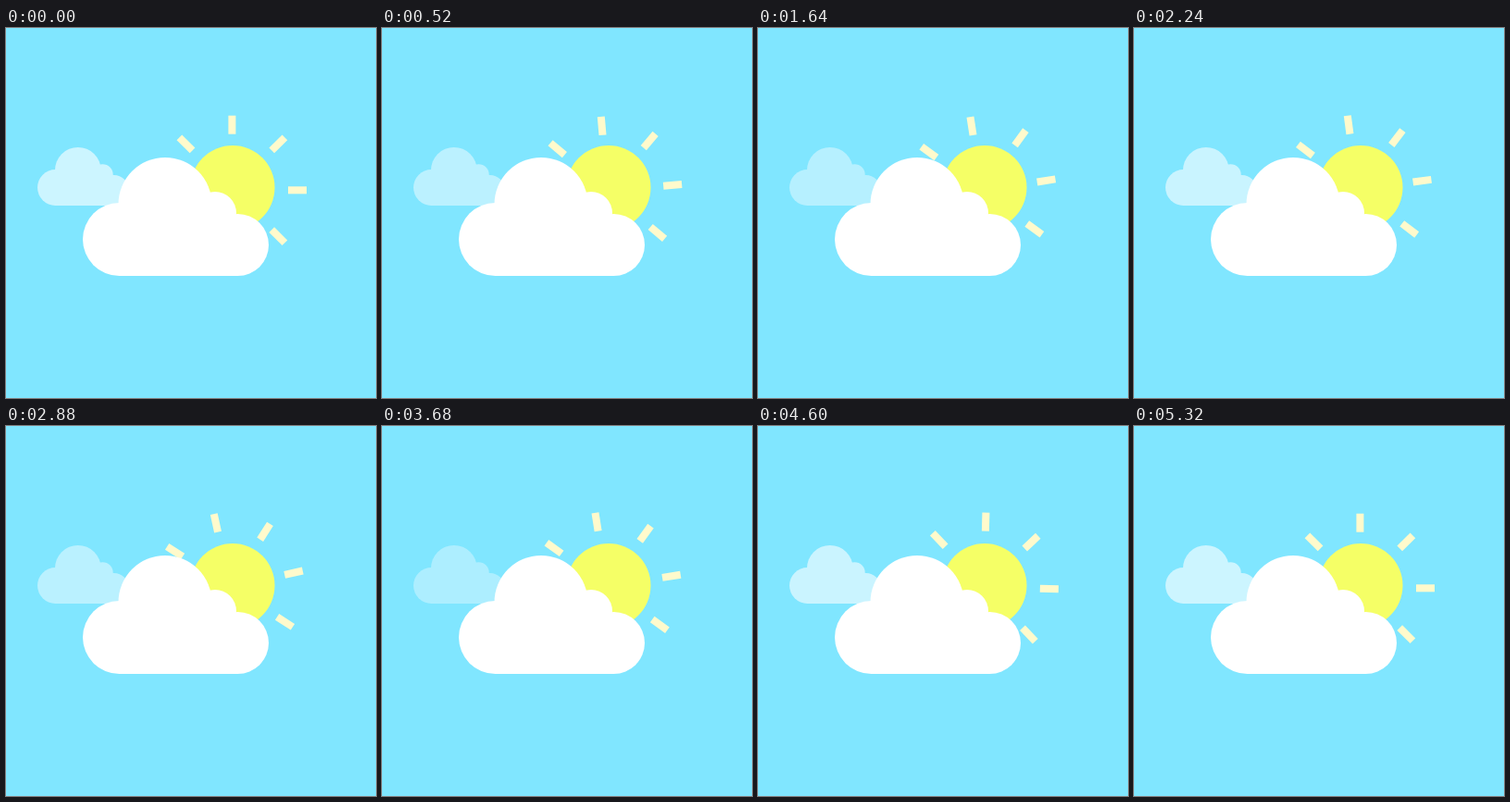
Animation of 400x400 px, one loop 5360 ms. Source, as an HTML page:

```html
<!DOCTYPE html>
<html lang="en">
<head>
<meta charset="utf-8">
<title>Sun and clouds</title>
<style>
  html, body { margin: 0; width: 100%; height: 100%; overflow: hidden; background: #80e6ff; }
  svg { display: block; width: 100%; height: 100%; }
</style>
</head>
<body>
<svg viewBox="0 0 400 400">
  <defs>
    <g id="cloud" fill="#fff">
      <circle cx="122.5" cy="228.5" r="39.5"/>
      <circle cx="172" cy="190.5" r="50.5"/>
      <circle cx="226" cy="200" r="23"/>
      <circle cx="250.5" cy="234.5" r="33.5"/>
      <path d="M122 268V228L172 190L226 200L250.5 234V268Z"/>
    </g>
    <rect id="ray" x="60.6" y="-4" width="20" height="8" fill="#fffacc"/>
  </defs>
  <g id="far"><use href="#cloud" transform="translate(-6.8 60.1) scale(.492)"/></g>
  <g id="rays"></g>
  <circle cx="245" cy="172.5" r="45.5" fill="#f5ff66"/>
  <use href="#cloud"/>
</svg>
<script>
  const LOOP = 5360, STEP = 40, END = LOOP - STEP;
  const HALF_TURN = 2340; // the second half turn is slower
  const FADE = 1160;
  const far = document.getElementById('far');
  const rays = document.getElementById('rays');

  for (let a = 0; a < 360; a += 45)
    rays.innerHTML += `<use href="#ray" transform="translate(1.4 .4) rotate(${a})"/>`;

  const turn = t => t < HALF_TURN
    ? 180 * t / HALF_TURN
    : 180 + 180 * (t - HALF_TURN) / (END - HALF_TURN);

  // Two linear fades down and up, then a hold
  const opacity = t => t > 4 * FADE ? .6 : .3 + .3 * Math.abs(1 - t / FADE % 2);

  function draw(now) {
    const t = Math.floor(now % LOOP / STEP) * STEP;
    rays.setAttribute('transform', `translate(243 174.9) rotate(${turn(t)})`);
    far.setAttribute('opacity', opacity(t));
  }

  let start;
  function tick(now) {
    start ??= now;
    draw(now - start);
    requestAnimationFrame(tick);
  }
  draw(0);
  requestAnimationFrame(tick);
</script>
</body>
</html>
```
